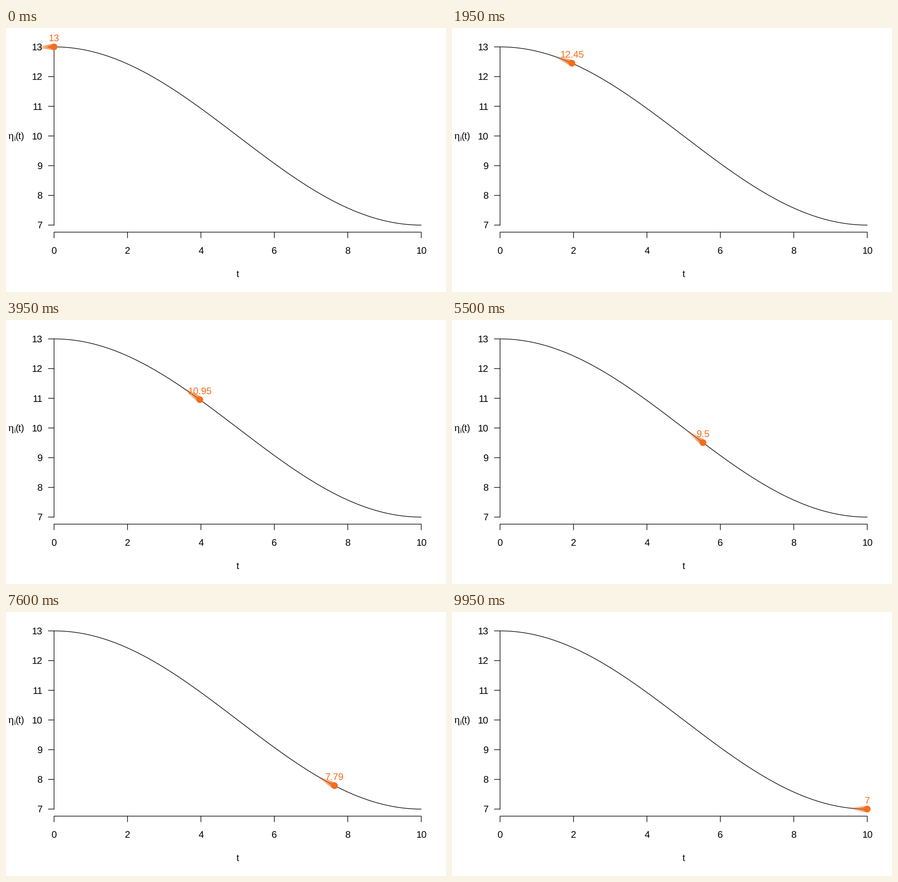
A matplotlib script that plays this animation: 966 px wide and 580 px high, repeating every 10000 ms.

```python
import numpy as np
import matplotlib.pyplot as plt
from matplotlib.animation import FuncAnimation
from matplotlib.patches import Circle

W, H, DPI = 966, 580, 100
FRAMES, INTERVAL = 200, 50
PX = 72 / DPI                      # points per pixel
FONT_PX, LINE_PX = 21, 1.35
ORANGE = "#f36e1b"
LEFT, RIGHT, TOP, BOTTOM = 105.5, 911.6, 41.5, 433.0
AXIS_Y, TICK = 448.5, 12.6
BALL_R = 7.3
TAIL_N, TAIL_T = 40, 0.43

plt.rcParams.update({"font.family": "Liberation Sans", "text.hinting": "none"})


def eta(t):
    return 10 + 3 * np.cos(np.pi * t / 10)


def to_x(t):
    return LEFT + (RIGHT - LEFT) * t / 10


def to_y(v):
    return TOP + (BOTTOM - TOP) * (13 - v) / 6


fig = plt.figure(figsize=(W / DPI, H / DPI), dpi=DPI, facecolor="white")
ax = fig.add_axes([0, 0, 1, 1])
ax.set_xlim(0, W)
ax.set_ylim(H, 0)
ax.axis("off")


def line(xs, ys):
    ax.plot(xs, ys, color="black", lw=LINE_PX * PX, snap=False, zorder=1,
            solid_capstyle="round", solid_joinstyle="round")


def write(x, y, s, ha="center", size=FONT_PX, color="black", **kw):
    return ax.text(x, y, s, ha=ha, va="baseline", fontsize=size * PX,
                   color=color, **kw)


# Axes
line([LEFT, LEFT], [TOP, BOTTOM])
for v in range(7, 14):
    y = to_y(v)
    line([LEFT - TICK, LEFT], [y, y])
    write(80.2, y + 7.5, str(v), ha="right")

line([LEFT, RIGHT], [AXIS_Y, AXIS_Y])
for t in range(0, 11, 2):
    x = to_x(t)
    line([x, x], [AXIS_Y, AXIS_Y + TICK])
    write(x, 495.5, str(t))

# Axis titles
write(508.5, 547, "t")
write(4.8, 244, "η", ha="left", size=23.5, family="Liberation Serif")
write(17.3, 247.5, "i", ha="left", size=14.7)
write(20.8, 244, "(t)", ha="left")

# Curve
ts = np.linspace(0, 10, 301)
line(to_x(ts), to_y(eta(ts)))

# Fading tail, oldest dot first
age = np.linspace(1, 0, TAIL_N)
radii = BALL_R - 4.8 * age
colors = np.tile(plt.matplotlib.colors.to_rgba(ORANGE), (TAIL_N, 1))
colors[:, 3] = 0.03 + 0.10 * (1 - age)
tail = ax.scatter(np.zeros(TAIL_N), np.zeros(TAIL_N), s=(2 * radii * PX) ** 2,
                  c=colors, linewidths=0, zorder=2)
ball = ax.add_patch(Circle((0, 0), BALL_R, fc=ORANGE, lw=0, zorder=3))
label = write(0, 0, "", color=ORANGE, zorder=4)


def update(k):
    t = 10 * k / (FRAMES - 1)
    v = eta(t)
    x, y = to_x(t), to_y(v)
    past = t - TAIL_T * age
    tail.set_offsets(np.column_stack([to_x(past), to_y(eta(past))]))
    ball.center = x, y
    label.set_position((x, y - 12.3))
    label.set_text(f"{round(v, 2):g}")
    return tail, ball, label


anim = FuncAnimation(fig, update, frames=FRAMES, interval=INTERVAL,
                     repeat=True, repeat_delay=0, blit=False)
plt.show()
```
